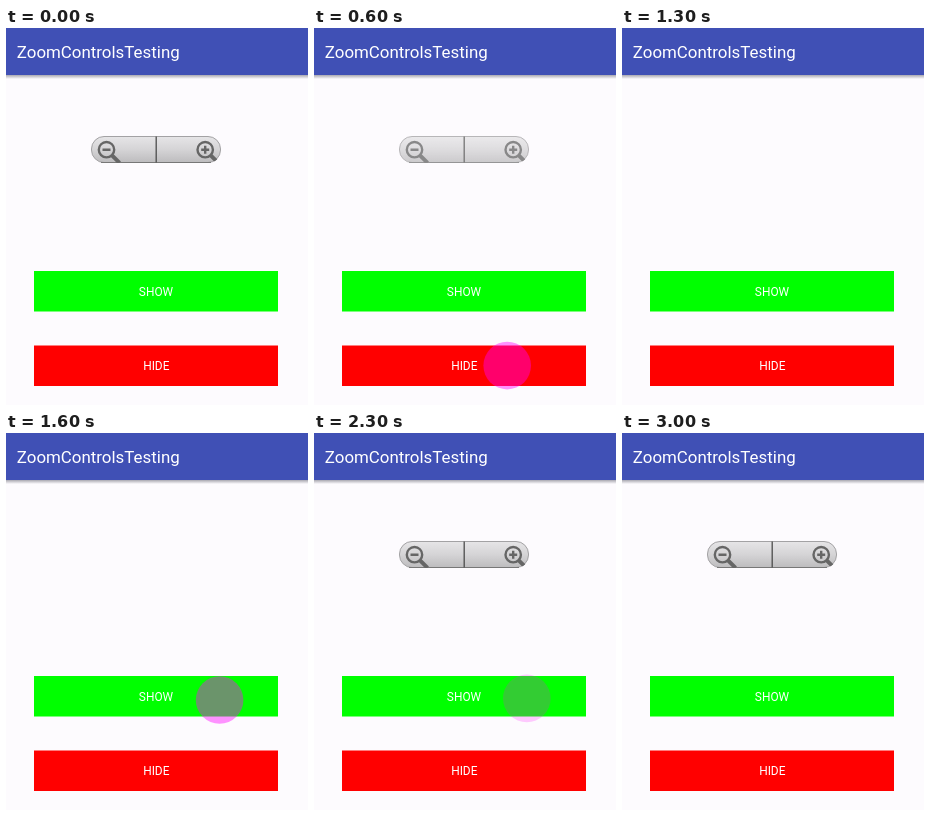
An HTML page that plays this animation: 302x377 px, repeating every 3100 ms.

```html
<!DOCTYPE html>
<html lang="en">
<head>
<meta charset="utf-8">
<title>ZoomControlsTesting</title>
<style>
  html, body { margin: 0; width: 100%; height: 100%; overflow: hidden; background: #fdfbfe; }
  svg { display: block; width: 100%; height: 100%; }
  text { font-family: Roboto, sans-serif; fill: #fff; }
  .title { font-size: 16.9px; }
  .label { font-size: 11.9px; text-anchor: middle; }
  .icon { fill: none; stroke: #666; stroke-width: 2.4; }
</style>
</head>
<body>
<svg viewBox="0 0 302 377">
  <defs>
    <linearGradient id="shade" x2="0" y2="1">
      <stop offset="0" stop-color="#a9a8b0"/>
      <stop offset="1" stop-color="#fdfbfe"/>
    </linearGradient>
    <linearGradient id="metal" x2="0" y2="1">
      <stop offset="0" stop-color="#e6e5e7"/>
      <stop offset=".5" stop-color="#d5d4d6"/>
      <stop offset="1" stop-color="#bdbcbe"/>
    </linearGradient>
    <clipPath id="pill"><rect x="85" y="108" width="130" height="27" rx="13"/></clipPath>
  </defs>

  <rect width="302" height="377" fill="#fdfbfe"/>
  <rect y="47" width="302" height="4" fill="url(#shade)"/>
  <rect width="302" height="47" fill="#4050b5"/>
  <text class="title" x="10.8" y="30">ZoomControlsTesting</text>

  <g id="zoom">
    <rect x="85.5" y="108.5" width="129" height="26" rx="12.5" fill="url(#metal)" stroke="#a3a2a4"/>
    <path d="M95 134.5H205" stroke="#777" fill="none"/>
    <path d="M150.2 108.5V134.5" stroke="#4c4c4c" stroke-width="1.3"/>
    <g class="icon" clip-path="url(#pill)">
      <circle cx="100.5" cy="121.7" r="7.7"/>
      <path d="M96.5 121.7h8"/>
      <path d="M106 127.3l7.5 7.5" stroke-width="4"/>
      <circle cx="199.2" cy="121.7" r="7.7"/>
      <path d="M195.2 121.7h8M199.2 117.7v8"/>
      <path d="M204.7 127.3l6 6" stroke-width="4"/>
    </g>
  </g>

  <rect x="28" y="243" width="244" height="40.5" fill="#0f0"/>
  <text class="label" x="150" y="268">SHOW</text>
  <rect x="28" y="317.5" width="244" height="40.5" fill="#f00"/>
  <text class="label" x="150.3" y="342.3">HIDE</text>

  <circle id="touch" r="23.8" fill="#f0f"/>
</svg>
<script>
  const LOOP = 3100, STEP = 100, FADE = 500;
  const zoom = document.getElementById('zoom');
  const touch = document.getElementById('touch');
  const clamp = v => Math.min(1, Math.max(0, v));
  const ease = p => (1 - Math.cos(Math.PI * clamp(p))) / 2;

  const taps = [
    { x: 193.2, y: 337.6, down: 200, up: 700, drift: 0 },
    { x: 213.6, y: 267, down: 1600, up: 2100, drift: -1.6 }
  ];

  function draw(t) {
    const shown = t < 1500 ? 1 - ease((t - 440) / FADE) : ease((t - 1650) / FADE);
    zoom.setAttribute('opacity', shown);

    const tap = taps[t < 1500 ? 0 : 1];
    const gone = clamp((t - tap.up) / 380);
    const moved = tap.drift * clamp((t - tap.down - 200) / 500);
    touch.setAttribute('cx', tap.x + moved / 2);
    touch.setAttribute('cy', tap.y + moved);
    touch.setAttribute('opacity', t < tap.down ? 0 : 0.42 * (1 - gone));
  }

  function tick() {
    const t = performance.now() % LOOP;
    draw(Math.floor(t / STEP) * STEP);
    requestAnimationFrame(tick);
  }
  tick();
</script>
</body>
</html>
```
